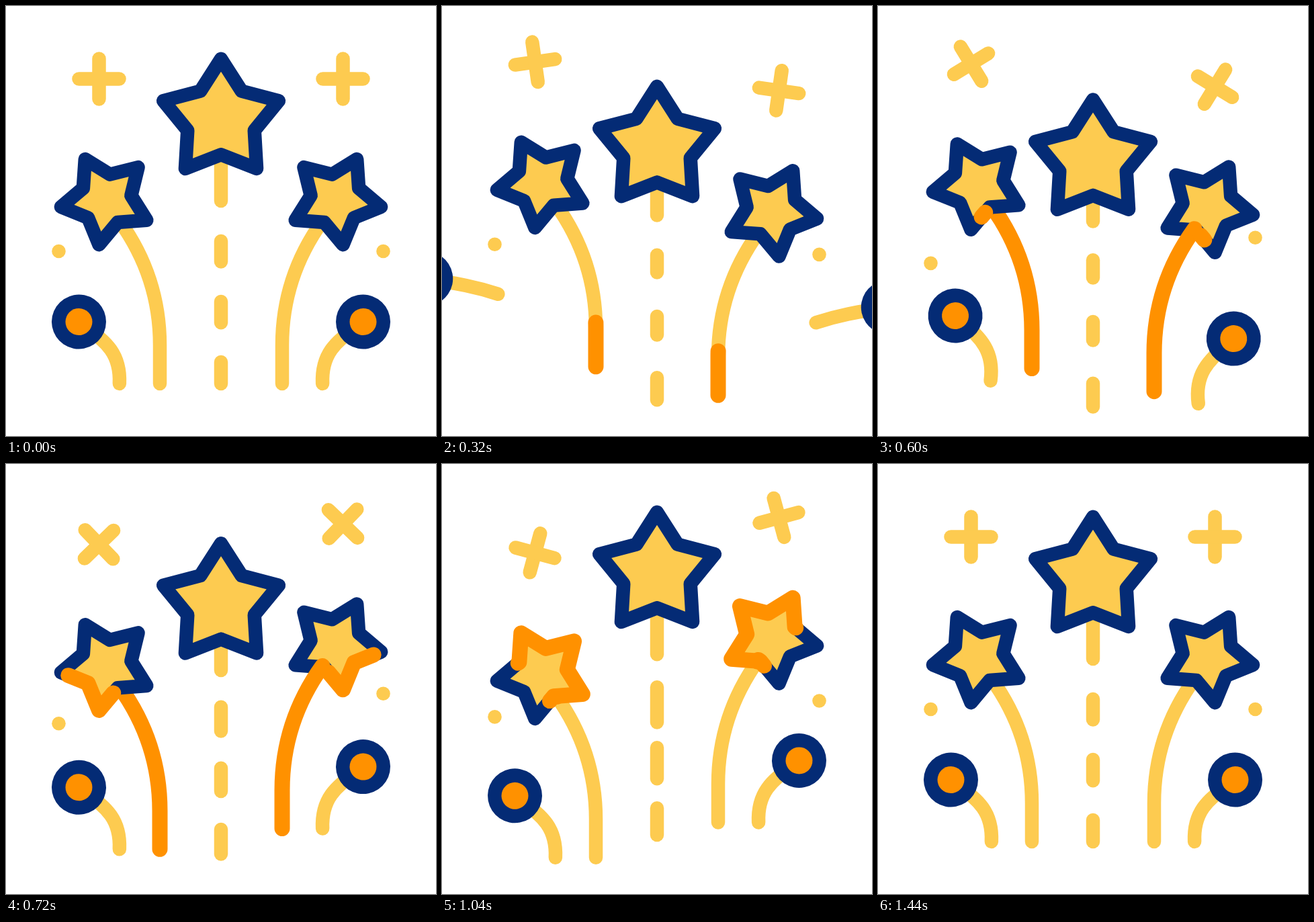
Animation of 640 by 640 pixels, one loop 1480 ms. Source, as an HTML page with a canvas:

```html
<!DOCTYPE html>
<html lang="en">
<head>
<meta charset="utf-8">
<title>Star fireworks</title>
<style>
  html, body { margin: 0; overflow: hidden; background: #fff; }
  canvas { display: block; }
</style>
</head>
<body>
<canvas width="640" height="640"></canvas>
<script>
const ctx = document.querySelector('canvas').getContext('2d');
const YELLOW = '#fdcb50', NAVY = '#042b75', ORANGE = '#ff9100';
const WIDTH = 20.5, GLOW_WIDTH = 23;

// Regular star; runs one edge past a full turn so a glow can start mid-edge.
function starPath(cx, cy, tip, notch, notchAngle) {
  const path = new Path2D();
  for (let i = 0; i < 12; i++) {
    const r = i % 2 ? tip : notch, angle = (notchAngle + 36 * i) * Math.PI / 180;
    path.lineTo(cx + r * Math.cos(angle), cy + r * Math.sin(angle));
  }
  path.closePath();
  return path;
}

const bigStar = starPath(320, 169, 90.3, 52.3, 90);
const smallStar = starPath(148.8, 288.2, 67.8, 38, 62.8);
const stem = new Path2D('M229 562V505C229 430 205 370 169 320');

// Each swing goes from rest to a first extreme, to a second one and back.
const STAR_TIMES = [115, 480, 1040, 1440];
const DASH_TIMES = [115, 480, 1000, 1440];
const SIDE_TIMES = [80, 480, 860, 1380];
const DOT_TIMES = [80, 350, 670, 1440];

const sides = [
  { lift: [-38.5, 32.5], dot: [-10.5, 21.5], drift: 59 },
  { lift: [26.5, -39], dot: [5, -23.5], drift: 20, mirrored: true }
];

const clamp = u => Math.min(1, Math.max(0, u));
const mix = (a, b, u) => a + (b - a) * u;
const ease = (t, from, to) => (1 - Math.cos(Math.PI * clamp((t - from) / (to - from)))) / 2;

const swing = (t, [t0, t1, t2, t3], first, second) =>
  first * ease(t, t0, t1) + (second - first) * ease(t, t1, t2) - second * ease(t, t2, t3);

function line(x1, y1, x2, y2) {
  ctx.beginPath();
  ctx.moveTo(x1, y1);
  ctx.lineTo(x2, y2);
  ctx.strokeStyle = YELLOW;
  ctx.stroke();
}

function disc(x, y, r, color) {
  ctx.beginPath();
  ctx.arc(x, y, r, 0, 2 * Math.PI);
  ctx.fillStyle = color;
  ctx.fill();
}

function star(path) {
  ctx.fillStyle = YELLOW;
  ctx.fill(path);
  ctx.strokeStyle = NAVY;
  ctx.stroke(path);
}

// Orange stroke on the part of the path between two distances.
function glow(path, from, to) {
  if (to - from < 1) return;
  ctx.save();
  ctx.lineWidth = GLOW_WIDTH;
  ctx.setLineDash([to - from, 9999]);
  ctx.lineDashOffset = -from;
  ctx.strokeStyle = ORANGE;
  ctx.stroke(path);
  ctx.restore();
}

function comet(x, y, angle, bend) {
  ctx.save();
  ctx.translate(x, y);
  ctx.rotate(angle);
  ctx.beginPath();
  ctx.moveTo(0, 0);
  ctx.bezierCurveTo(37, -12 * bend, 67, -31 * bend, 110, 0);
  ctx.strokeStyle = YELLOW;
  ctx.stroke();
  disc(0, 0, 40.5, NAVY);
  disc(0, 0, 20, ORANGE);
  ctx.restore();
}

// One comet flies out sideways while the next rises from below and settles.
function drawComets(t, drift) {
  if (t < 540) {
    const out = Math.max(0, (t - 80) / 160), turn = clamp(out);
    comet(108.5 - 88.5 * out, 470 - 39 * turn, mix(.99, .21, turn), mix(1, .15, turn));
  }
  if (t > 280) {
    const left = (Math.max(0, 680 - t) / 240) ** 2;
    comet(108.5 + drift * left, 470 + 121 * left, .99 + .75 * left, 1);
  }
}

function drawPlus(t) {
  ctx.save();
  ctx.translate(138.5, 108.5);
  ctx.rotate(-Math.PI / 2 * ease(t, 60, 1400));
  line(-30, 0, 30, 0);
  line(0, -30, 0, 30);
  ctx.restore();
}

function drawCenter(t) {
  const y = swing(t, STAR_TIMES, 69, -7);
  const shift = (first, second) => swing(t, DASH_TIMES, first, second);
  line(320, 200 + y, 320, 290 + shift(36, -7));
  for (let i = 0; i < 3; i++) {
    const top = 350 + 90 * i + shift(35 + 2 * i, -18);
    const bottom = 380.5 + 90.7 * i + shift(27 + 3.5 * i * i, 4 - 7 * i);
    line(320, top, 320, bottom);
  }
  ctx.save();
  ctx.translate(0, y);
  star(bigStar);
  ctx.restore();
}

function drawSide(t, { lift, dot, drift, mirrored }) {
  ctx.save();
  if (mirrored) ctx.transform(-1, 0, 0, 1, 640, 0);
  disc(78.5, 365 + swing(t, DOT_TIMES, ...dot), 10.3, YELLOW);
  ctx.translate(0, swing(t, SIDE_TIMES, ...lift));
  drawPlus(t);

  const stemGlow = () => glow(stem, 256 * ease(t, 720, 1070), 256 * ease(t, 195, 565));
  ctx.strokeStyle = YELLOW;
  ctx.stroke(stem);
  if (!mirrored) stemGlow();
  star(smallStar);
  if (mirrored) stemGlow();
  glow(smallStar, 10 + 432 * ease(t, 803, 1370), 10 + 432 * ease(t, 555, 1050));

  drawComets(t, drift);
  ctx.restore();
}

function draw(now) {
  const t = Math.floor(now % 1480 / 40) * 40;
  ctx.fillStyle = '#fff';
  ctx.fillRect(0, 0, 640, 640);
  ctx.lineWidth = WIDTH;
  ctx.lineCap = ctx.lineJoin = 'round';
  drawCenter(t);
  for (const side of sides) drawSide(t, side);
}

const start = performance.now();
function tick() {
  draw(performance.now() - start);
  requestAnimationFrame(tick);
}
tick();
</script>
</body>
</html>
```
